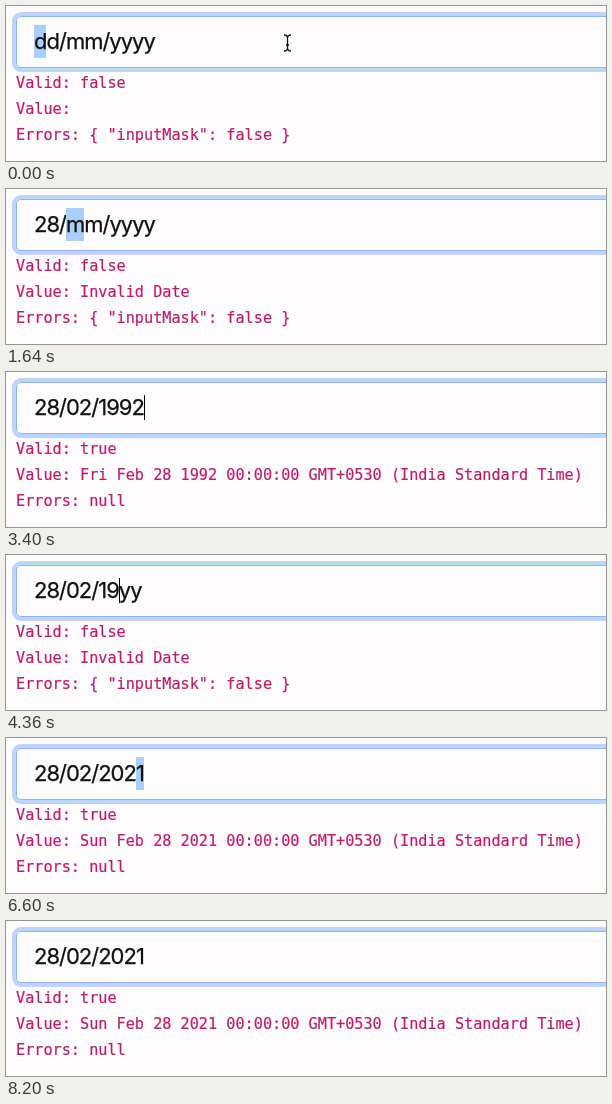
An HTML page that plays this animation: 600 px wide and 155 px high, repeating every 8.24 s.

```html
<!DOCTYPE html>
<html lang="en">
<head>
<meta charset="utf-8">
<title>Date input mask</title>
<style>
html, body { margin: 0; width: 100%; height: 100%; overflow: hidden; }
body { position: relative; background: #fffcfe; }
#field {
  position: absolute; left: 10px; top: 10px; width: 640px; height: 52px; box-sizing: border-box;
  border: 1.4px solid #86b7fe; border-radius: 5px; box-shadow: 0 0 0 4px #bfd4fb;
}
#date {
  position: absolute; left: 28px; top: 19px; height: 33px; white-space: pre;
  font: 22px/33px Inter, sans-serif; letter-spacing: -1px; color: #111;
  -webkit-text-stroke: .25px;
}
mark { display: inline-block; height: 33px; vertical-align: top; background: #a9cffd; color: inherit; }
#date i { position: absolute; top: 4px; width: 1.4px; height: 25px; background: #000; }
#status {
  position: absolute; left: 10px; top: 64px; margin: 0; white-space: pre;
  font: 15.2px/26px "DejaVu Sans Mono", monospace; color: #bb1f69;
  -webkit-text-stroke: .2px;
}
#pointer { position: absolute; left: 276px; top: 28px; }
</style>
</head>
<body>
<div id="field"></div>
<div id="date"></div>
<pre id="status"></pre>
<svg id="pointer" width="11" height="18" fill="none" stroke="#111" stroke-width="1.3">
  <path d="M2 1 Q5.5 1 5.5 4 Q5.5 1 9 1 M5.5 4 V14 M2 17 Q5.5 17 5.5 14 Q5.5 17 9 17 M4 11 H7"/>
</svg>
<script>
const LOOP = 8240, BLINK = 500, MASK = "dd/mm/yyyy";
const DAYS = { 1992: "Fri", 2021: "Sun" };

// [time, typed text, cursor]: "block" marks the next slot, "caret" blinks, "last" marks the final digit
const STEPS = [
  [0, "", "block"], [440, "2", "block"], [1000, "28/", "block"],
  [1720, "28/0", "block"], [1960, "28/02/", "block"], [2160, "28/02/1", "block"],
  [2440, "28/02/19", "block"], [2700, "28/02/199", "block"], [2960, "28/02/1992", "caret"],
  [4060, "28/02/199", "caret"], [4300, "28/02/19", "caret"], [4540, "28/02/1", "caret"],
  [4780, "28/02/", "caret"], [5600, "28/02/2", "block"], [5720, "28/02/20", "block"],
  [5840, "28/02/202", "block"], [5960, "28/02/2021", "caret"],
  [6400, "28/02/2021", "last"], [6680, "28/02/2021", "caret"]
];

const find = id => document.getElementById(id);
const setHtml = (node, html) => { if (node.shown !== html) node.innerHTML = node.shown = html; };

function dateHtml(typed, cursor, age) {
  const text = typed + MASK.slice(typed.length);
  const at = cursor === "last" ? text.length - 1 : typed.length;
  const before = text.slice(0, at);
  if (cursor === "caret") {
    const visible = Math.floor(age / BLINK) % 2 === 0;
    return before + (visible ? "<i></i>" : "") + text.slice(at);
  }
  return `${before}<mark>${text[at]}</mark>${text.slice(at + 1)}`;
}

function statusText(typed) {
  const valid = typed.length === MASK.length, year = typed.slice(6);
  const value = valid ? `${DAYS[year]} Feb 28 ${year} 00:00:00 GMT+0530 (India Standard Time)`
    : typed ? "Invalid Date" : "";
  const errors = valid ? "null" : '{ "inputMask": false }';
  return `Valid: ${valid}\nValue: ${value}\nErrors: ${errors}`;
}

function draw() {
  const time = performance.now() % LOOP;
  const [start, typed, cursor] = STEPS.filter(step => step[0] <= time).pop();
  setHtml(find("date"), dateHtml(typed, cursor, time - start));
  setHtml(find("status"), statusText(typed));
  find("pointer").style.display = typed ? "none" : "";
  requestAnimationFrame(draw);
}
draw();
</script>
</body>
</html>
```
